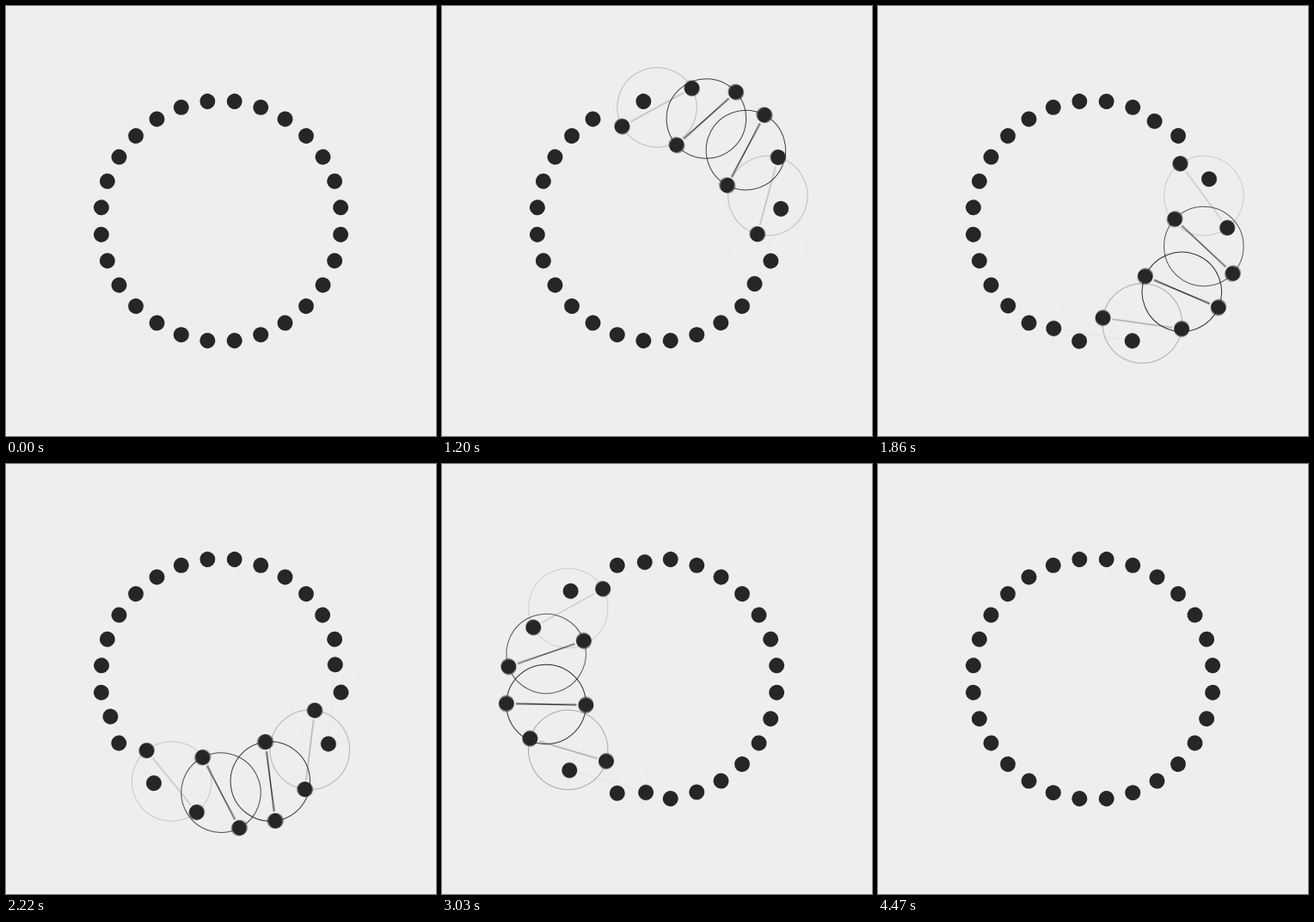
An HTML page with a canvas that plays this animation: 500 px wide and 500 px high, repeating every 5170 ms.

```html
<!DOCTYPE html>
<html>
<head>
<meta charset="utf-8">
<title>Swapping dots</title>
<style>
  html, body { margin: 0; width: 100%; height: 100%; overflow: hidden; background: #eee; }
  canvas { display: block; width: 500px; height: 500px; }
</style>
</head>
<body>
<canvas id="stage" width="500" height="500"></canvas>
<script>
const SIZE = 500, TAU = Math.PI * 2;
const LOOP = 5170, STEP = 30, STEPS = 150;
const PAIRS = 14, RING = 140, DOT = 9, GAP = 11;
const TURN = 1800, STAGGER = (STEP * STEPS - TURN) / (PAIRS - 1);
const HALF_SPAN = TAU / PAIRS * 0.75;
const ORBIT_DISTANCE = RING * Math.cos(HALF_SPAN);
const ORBIT = RING * Math.sin(HALF_SPAN);
const SAMPLES = 8, SHUTTER = 0.6;
const PAPER = '#eeeeee', INK = '#262626';

const screen = document.getElementById('stage').getContext('2d');
const layer = document.createElement('canvas');
layer.width = layer.height = SIZE;
const ctx = layer.getContext('2d');

const smooth = p => p * p * (3 - 2 * p);
const clamp = p => Math.min(1, Math.max(0, p));

function circle(x, y, r) {
  ctx.beginPath();
  ctx.arc(x, y, r, 0, TAU);
}

function drawPair(index, time) {
  const turn = smooth(smooth(clamp((time - index * STAGGER) / TURN)));
  const heading = index * TAU / PAIRS;

  ctx.save();
  ctx.translate(SIZE / 2 + ORBIT_DISTANCE * Math.sin(heading),
                SIZE / 2 - ORBIT_DISTANCE * Math.cos(heading));
  ctx.rotate(heading + Math.PI * turn);

  ctx.globalAlpha = Math.sin(Math.PI * turn) ** 2;
  ctx.lineWidth = 1;
  circle(0, 0, ORBIT);
  ctx.stroke();
  ctx.lineWidth = 1.5;
  ctx.beginPath();
  ctx.moveTo(GAP - ORBIT, 0);
  ctx.lineTo(ORBIT - GAP, 0);
  ctx.stroke();

  ctx.globalAlpha = 1;
  for (const side of [-1, 1]) {
    circle(side * ORBIT, 0, DOT);
    ctx.fill();
  }
  ctx.restore();
}

function drawScene(time) {
  ctx.fillStyle = PAPER;
  ctx.fillRect(0, 0, SIZE, SIZE);
  ctx.fillStyle = ctx.strokeStyle = INK;
  for (let i = 0; i < PAIRS; i++) drawPair(i, time);
}

// Averages several moments within one step to give motion blur.
function render(step) {
  for (let k = 0; k < SAMPLES; k++) {
    drawScene(STEP * (step + SHUTTER * (k + 0.5) / SAMPLES));
    screen.globalAlpha = 1 / (k + 1);
    screen.drawImage(layer, 0, 0);
  }
}

let start = null, shown = -1;
function tick(now) {
  if (start === null) start = now;
  const elapsed = Math.max(0, now - start) % LOOP;
  const step = Math.min(STEPS - 1, Math.floor(elapsed / STEP));
  if (step !== shown) {
    render(step);
    shown = step;
  }
  requestAnimationFrame(tick);
}

render(0);
requestAnimationFrame(tick);
</script>
</body>
</html>
```
